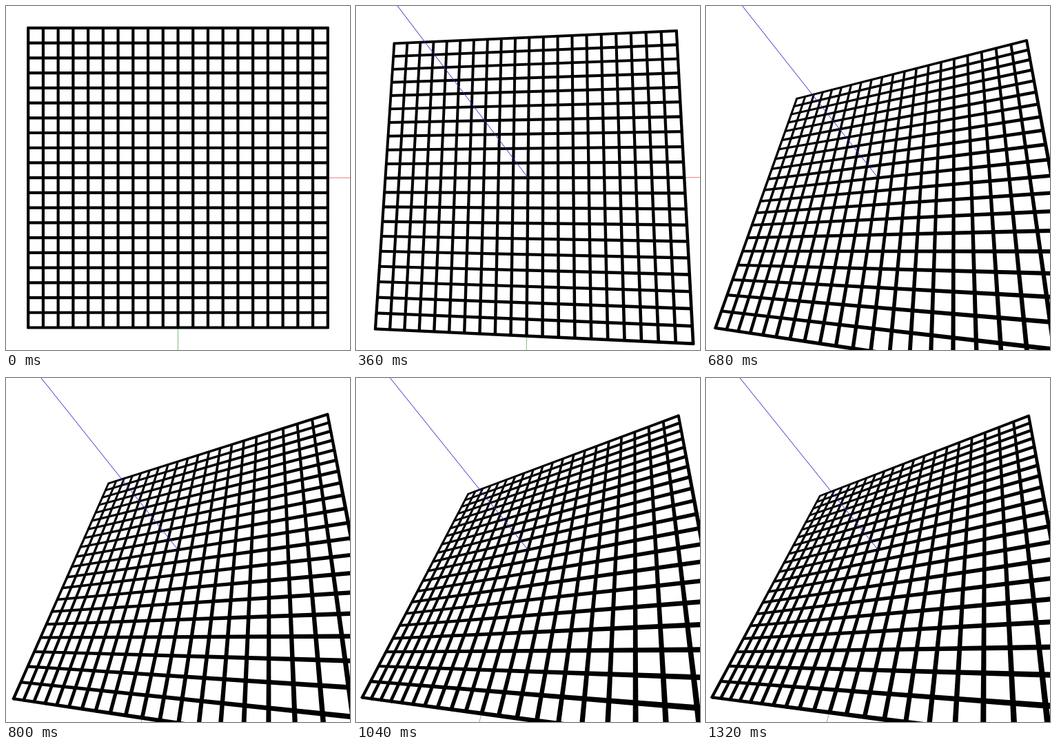
Write an HTML page with a canvas that moves like this. It is 499 px wide and 499 px high and loops after 1360 ms.

```html
<!DOCTYPE html>
<html lang="en">
<head>
<meta charset="utf-8">
<title>Tilting grid</title>
<style>
  html, body { margin: 0; width: 100%; height: 100%; overflow: hidden; background: #fff; }
  canvas { display: block; width: 499px; height: 499px; }
</style>
</head>
<body>
<canvas id="stage" width="499" height="499"></canvas>
<script>
const ctx = document.getElementById('stage').getContext('2d');
const LOOP = 1360, STEP = 40;
const CX = 249.5, CY = 249.2;
const HALF = 217.3, CELLS = 20, FOCAL = 438, BAR = 4.2;

// [time in ms, tilt in degrees]
const TILT = [
  [200, 0], [240, 1], [360, 8.7], [520, 24.2], [680, 39.6],
  [800, 47], [920, 51.5], [1160, 54.2], [1320, 54.4]
];

function slope(i) {
  if (i === 0 || i === TILT.length - 1) return 0;
  const a = TILT[i - 1], b = TILT[i + 1];
  return (b[1] - a[1]) / (b[0] - a[0]);
}

// Smooth Hermite curve through the tilt table
function tiltAt(t) {
  const last = TILT.length - 1;
  if (t <= TILT[0][0]) return TILT[0][1];
  if (t >= TILT[last][0]) return TILT[last][1];
  const i = TILT.findIndex(k => k[0] > t) - 1;
  const [t0, v0] = TILT[i], [t1, v1] = TILT[i + 1];
  const d = t1 - t0, u = (t - t0) / d, r = 1 - u;
  return v0 * (1 + 2 * u) * r * r + v1 * u * u * (3 - 2 * u)
    + d * u * r * (slope(i) * r - slope(i + 1) * u);
}

// Rotation about a nearly flat diagonal axis
function makeRotation(deg) {
  const rad = Math.PI / 180;
  const phi = (36.9 + 0.047 * deg) * rad;
  const raw = [Math.cos(phi), -Math.sin(phi), 0.023];
  const len = Math.hypot(...raw);
  const [p, q, r] = raw.map(v => v / len);
  const c = Math.cos(deg * rad), s = Math.sin(deg * rad);
  return (x, y, z) => {
    const dot = (p * x + q * y + r * z) * (1 - c);
    return [
      x * c + (q * z - r * y) * s + p * dot,
      y * c + (r * x - p * z) * s + q * dot,
      z * c + (p * y - q * x) * s + r * dot
    ];
  };
}

function draw(t) {
  const rotate = makeRotation(tiltAt(t));

  const project = (x, y) => {
    const [px, py, pz] = rotate(x * HALF, y * HALF, 0);
    const scale = FOCAL / (FOCAL - pz);
    return { x: CX + px * scale, y: CY + py * scale, scale };
  };

  const bar = (a, b) => {
    const dx = b.x - a.x, dy = b.y - a.y, len = Math.hypot(dx, dy);
    const nx = -dy / len * BAR / 2, ny = dx / len * BAR / 2;
    ctx.beginPath();
    ctx.moveTo(a.x + nx * a.scale, a.y + ny * a.scale);
    ctx.lineTo(b.x + nx * b.scale, b.y + ny * b.scale);
    ctx.lineTo(b.x - nx * b.scale, b.y - ny * b.scale);
    ctx.lineTo(a.x - nx * a.scale, a.y - ny * a.scale);
    ctx.fill();
  };

  const line = (x, y, color) => {
    ctx.strokeStyle = color;
    ctx.lineWidth = 1;
    ctx.beginPath();
    ctx.moveTo(CX, CY);
    ctx.lineTo(x, y);
    ctx.stroke();
  };

  ctx.fillStyle = '#fff';
  ctx.fillRect(0, 0, 499, 499);

  const right = project(1.3, 0), down = project(0, 1.3);
  line(right.x, right.y, '#f07878');
  line(down.x, down.y, '#78c078');

  ctx.fillStyle = '#000';
  const end = 1 + BAR / 3 / HALF;
  for (let i = 0; i <= CELLS; i++) {
    const v = i / CELLS * 2 - 1;
    bar(project(-end, v), project(end, v));
    bar(project(v, -end), project(v, end));
  }

  const [nx, ny] = rotate(0, 0, 1);
  const size = Math.hypot(nx, ny);
  if (size > 0.001) line(CX + nx / size * 600, CY + ny / size * 600, '#3a2cc8');
}

const start = performance.now();
function tick() {
  const t = Math.max(0, performance.now() - start) % LOOP;
  let shown = Math.floor(t / STEP) * STEP;
  if (shown === 400) shown = 360; // one pose is held twice as long
  draw(shown);
  requestAnimationFrame(tick);
}
tick();
</script>
</body>
</html>
```
